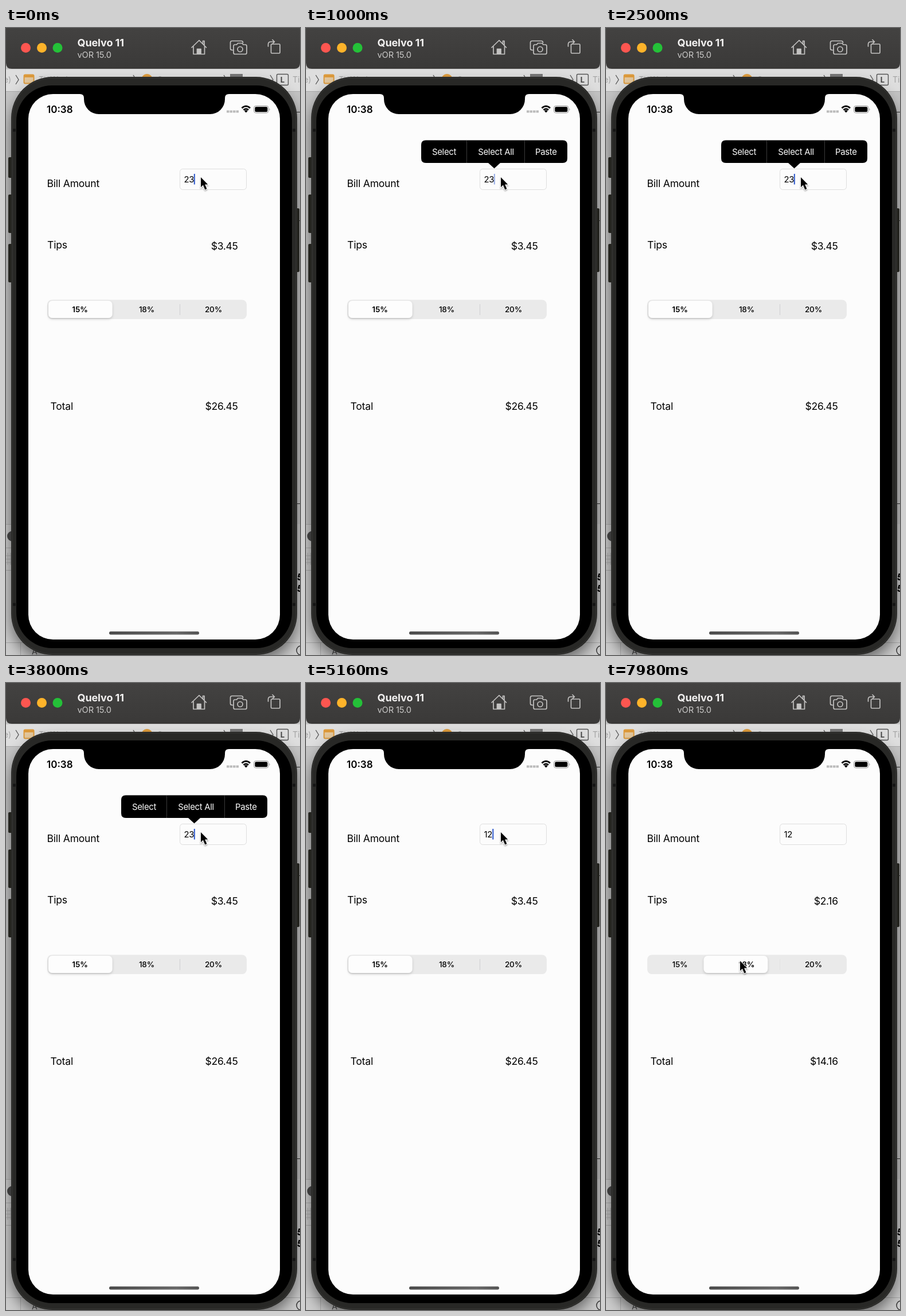
An HTML page for the animation above (8 s loop, 513 by 1092 pixels).

```html
<!DOCTYPE html>
<html lang="en">
<head>
<meta charset="utf-8">
<title>Tip calculator</title>
<style>
html, body { margin: 0; width: 100%; height: 100%; overflow: hidden; background: #b9b9b9; }
svg { display: block; width: 100%; height: 100%; }
text { font-family: Inter, Roboto, sans-serif; }
.label { font-size: 17.5px; letter-spacing: -.17px; }
.field { font-size: 14.9px; letter-spacing: -.3px; }
.seg { font-size: 13.6px; font-weight: 500; text-anchor: middle; letter-spacing: -.15px; }
.menu { font-size: 14.9px; letter-spacing: -.3px; text-anchor: middle; fill: #fff; }
.icon { fill: none; stroke: #c3c2c1; stroke-width: 1.7; stroke-linejoin: round; stroke-linecap: round; }
.end { text-anchor: end; letter-spacing: -.3px; }
</style>
</head>
<body>
<svg viewBox="0 0 513 1092">
  <defs>
    <filter id="blur" x="-20%" y="-20%" width="140%" height="140%"><feGaussianBlur stdDeviation="13"/></filter>
    <filter id="soft" x="-50%" y="-80%" width="200%" height="260%"><feGaussianBlur stdDeviation="9"/></filter>
    <filter id="lift" x="-10%" y="-20%" width="120%" height="150%"><feDropShadow dx="0" dy="2" stdDeviation="2" flood-opacity=".18"/></filter>
    <filter id="drop" x="-40%" y="-20%" width="200%" height="160%"><feDropShadow dx="0" dy="2" stdDeviation="1.4" flood-opacity=".35"/></filter>
    <linearGradient id="bar" x2="0" y2="1"><stop stop-color="#434241"/><stop offset="1" stop-color="#3a3938"/></linearGradient>
    <linearGradient id="home"><stop stop-color="#4c4c4c"/><stop offset=".75" stop-color="#6a6a6a"/><stop offset="1" stop-color="#555"/></linearGradient>
  </defs>

  <!-- window behind the phone -->
  <rect width="513" height="1092" fill="#c4c4c4"/>
  <rect y="72" width="513" height="38" fill="#dedede"/>
  <rect y="864" width="513" height="228" fill="#cdcdcd"/>
  <path d="M0 110.5H513M0 864.5H30M0 905.5H30M0 944.5H30M0 1070.5H513M25.5 1071V1092" stroke="#aaa" fill="none"/>
  <g font-size="14" fill="#a4a4a4">
    <text x="-4" y="95">e)</text>
    <text x="57" y="95">TipWork</text><text x="264" y="95">Screens</text>
    <text x="500" y="95">Ti</text>
  </g>
  <path d="M17 82l5 8-5 8M222 82l5 8-5 8M380 82l5 8-5 8M461 82l5 8-5 8" fill="none" stroke="#555" stroke-width="1.3"/>
  <rect x="31.5" y="81.5" width="17" height="15" rx="2" fill="#e4c89e" stroke="#dc9a3c" stroke-width="2"/>
  <path d="M32 84h16" stroke="#dc9a3c" stroke-width="4"/>
  <circle cx="246" cy="90" r="10" fill="#dc9a3c"/>
  <rect x="391" y="80" width="22" height="16" fill="#777"/>
  <path d="M0 925h9M0 919h9M0 931h9M3 914v21M8 914v21" stroke="#aaa"/>
  <rect x="472.5" y="80.5" width="20" height="19" rx="2" fill="#ddd" stroke="#555" stroke-width="1.4"/>
  <text x="482.5" y="95" font-size="13" font-weight="700" text-anchor="middle" fill="#444">L</text>
  <rect x="9" y="101" width="499" height="1002" rx="72" filter="url(#blur)" opacity=".5"/>
  <circle cx="11" cy="885" r="9" fill="#3c3c3c"/>
  <path d="M500 146.5H513M500 335.5H513M500 828.5H513" stroke="#222"/>
  <text x="45" y="1091" font-size="14" fill="#333">A</text>
  <circle cx="515" cy="1084" r="8" fill="none" stroke="#333" stroke-width="1.5"/>
  <g font-size="16" font-weight="800" font-style="italic"><text x="508" y="962">5</text><text x="508" y="982">5</text></g>

  <!-- simulator title bar -->
  <path d="M0 0H513V61Q513 71 503 71H10Q0 71 0 61Z" fill="url(#bar)"/>
  <circle cx="34.5" cy="34.5" r="8.5" fill="#fd5650"/>
  <circle cx="62.5" cy="34.5" r="8.5" fill="#fdb32a"/>
  <circle cx="90" cy="34.5" r="8.5" fill="#24c138"/>
  <text x="124.5" y="32" font-size="18" font-weight="700" letter-spacing="-.1" fill="#f3f2f1">Quelvo 11</text>
  <text x="124.5" y="51.5" font-size="14.6" letter-spacing="-.1" fill="#cbcac9">vOR 15.0</text>
  <g class="icon">
    <path d="M324 34L337 21.5L349.5 34M327 32V45.5H346.5V32M343.5 27V22.5H346V30"/>
    <path d="M333.5 45V36.5H340V45Z" fill="#c3c2c1"/>
    <path d="M396 38.5H394.5Q391.5 38.5 391.5 35.5V25.5Q391.5 22.5 394.5 22.5H410.5Q413.5 22.5 413.5 25.5"/>
    <path d="M399.5 29H402.5L404.5 26.5H412L414 29H417.5Q420 29 420 31.5V43Q420 45.5 417.5 45.5H399.5Q397 45.5 397 43V31.5Q397 29 399.5 29Z"/>
    <circle cx="408.5" cy="37" r="4.5"/>
    <rect x="462.5" y="28" width="15.5" height="16" rx="1.5"/>
    <path d="M457.5 32V28.5Q457.5 24 462 24H468M465 20.5L468.5 24L465 27.5"/>
  </g>

  <!-- phone body -->
  <g fill="#24241f">
    <rect x="4" y="225" width="9" height="36" rx="2"/><rect x="4" y="290" width="9" height="67" rx="2"/>
    <rect x="4" y="376" width="9" height="67" rx="2"/><rect x="503" y="314" width="9" height="111" rx="2"/>
  </g>
  <rect x="9" y="85" width="499" height="1007" rx="72" fill="#282826"/>
  <rect x="11" y="87" width="495" height="1003" rx="70" fill="none" stroke="#383836"/>
  <path d="M12 178h5M500 178h5M12 1004h5M500 1004h5" stroke="#151515" stroke-width="5"/>
  <rect x="18" y="100" width="481" height="980" rx="62"/>
  <rect x="39" y="115" width="439" height="950" rx="43" fill="#fcfcfc"/>
  <path d="M129 114H389V115Q382 115 382 122V124A26 26 0 0 1 356 150H162A26 26 0 0 1 136 124V122Q136 115 129 115Z"/>

  <!-- status bar -->
  <text x="71" y="147.5" font-size="17" font-weight="600">10:38</text>
  <path d="M385 145.5h4.5M390.5 145.5h4.5M396 145.5h4.5M401.5 145.5h4.5" stroke="#bbb" stroke-width="4"/>
  <path d="M411.5 139.5Q418.8 132.8 426 139.5M414.5 142.8Q418.8 138.8 423 142.8" fill="none" stroke="#000" stroke-width="2.7"/>
  <path d="M415.8 144.3Q418.8 141.8 421.8 144.3L418.8 147.5Z"/>
  <rect x="432.5" y="135.5" width="25.5" height="12.5" rx="3.8" fill="none" stroke="#999"/>
  <rect x="434.3" y="137.3" width="22" height="9" rx="2.2"/>
  <path d="M459.5 139.5Q461.5 141.8 459.5 144Z" fill="#999"/>

  <!-- app -->
  <g class="label">
    <text x="71.5" y="276.5">Bill Amount</text>
    <text x="72" y="384">Tips</text>
    <text x="77.5" y="665">Total</text>
    <text x="404.7" y="385.5" class="end" id="tip"></text>
    <text x="404.7" y="665" class="end" id="total"></text>
  </g>
  <g id="loupe">
    <ellipse cx="328" cy="263" rx="52" ry="36" fill="#eee" filter="url(#soft)"/>
    <rect x="288.5" y="241" width="80" height="44" rx="22" fill="#fff"/>
    <text x="310.5" y="269" class="field">23</text>
    <rect x="327.8" y="254" width="2" height="18.5" fill="#2c58cc"/>
  </g>
  <rect x="303.5" y="245.5" width="116" height="36" rx="5" fill="none" stroke="#dedede"/>
  <text x="310.5" y="269" class="field" id="bill"></text>
  <rect y="254" width="2" height="18.5" fill="#2c58cc" id="caret"/>

  <rect x="72" y="473.5" width="348" height="33.5" rx="8" fill="#eaeaea"/>
  <path d="M303.5 481V500" stroke="#cfcfd1" id="split"/>
  <rect x="74" y="475" width="111.5" height="30" rx="7" fill="#fdfdfd" filter="url(#lift)" id="pill"/>
  <text x="129" y="495" class="seg" id="low">15%</text>
  <text x="245.5" y="495" class="seg" id="mid">18%</text>
  <text x="362" y="495" class="seg">20%</text>

  <g id="popup">
    <path d="M209 195.5H448Q456 195.5 456 203.5V227Q456 235 448 235H339L328.5 244.5L318 235H209Q201 235 201 227V203.5Q201 195.5 209 195.5Z"/>
    <path d="M280.5 196V235M381.5 196V235" stroke="#3a3a3a"/>
    <text x="241" y="220.5" class="menu">Select</text>
    <text x="331.5" y="220.5" class="menu">Select All</text>
    <text x="418.8" y="220.5" class="menu">Paste</text>
  </g>
  <rect x="180" y="1051" width="157" height="5.5" rx="2.7" fill="url(#home)"/>
  <g id="mouse">
    <path d="M0 0V18.5L4.2 14.6L7.8 23L11.2 21.5L7.6 13.4H13.2Z" transform="scale(.93)" stroke="#fff" stroke-width="2" paint-order="stroke" filter="url(#drop)"/>
  </g>
</svg>
<script>
const $ = id => document.getElementById(id);
const ramp = (t, a, b) => Math.min(1, Math.max(0, (t - a) / (b - a)));
const ease = p => p * p * (3 - 2 * p);
const pulse = (t, a, b, c, d) => ramp(t, a, b) - ramp(t, c, d);
// value of the last [time, value] entry already reached
const at = (t, list) => list.filter(e => t >= e[0]).pop()[1];
const set = (id, attrs) => { for (const k in attrs) $(id).setAttribute(k, attrs[k]); };
const write = (id, s) => { if ($(id).textContent !== s) $(id).textContent = s; };

const CLICK = 7755;
const BILL = [[0, "23"], [4000, "2"], [4110, ""], [4700, "1"], [4900, "12"]];
const CARET_X = { "": 310.5, "1": 317, "2": 320, "23": 327.8, "12": 325.3 };
const BLINKS = [0, 400, 1700, 2300, 4000, 4110, 4700, 4900].map(s => [s, s]);
const PATH = [[5850, 340, 260], [6280, 311, 378], [6800, 234, 484]];

function mouseAt(t) {
  const [a, b, c] = PATH;
  const p = ramp(t, a[0], b[0]) ** 1.4, q = 1 - (1 - ramp(t, b[0], c[0])) ** 1.7;
  return [1, 2].map(i => a[i] + (b[i] - a[i]) * p + (c[i] - b[i]) * q);
}

function draw(t) {
  const clicked = t >= CLICK, bill = at(t, BILL);
  write("bill", bill);
  write("tip", clicked ? "$2.16" : "$3.45");
  write("total", clicked ? "$14.16" : "$26.45");

  const phase = (t - at(t, BLINKS)) % 1000;
  set("caret", { x: CARET_X[bill], opacity: clicked ? 0 : 1 - pulse(phase, 500, 700, 850, 1000) });

  set("popup", { opacity: pulse(t, 400, 600, 1750, 1945) + pulse(t, 2250, 2450, 4030, 4230) });
  const k = pulse(t, 1870, 2010, 2150, 2290);
  set("loupe", { opacity: k, transform: `translate(0 ${-44 * k})` });

  const slide = ease(ramp(t, CLICK, CLICK + 300));
  set("pill", { x: 74 + 114 * slide });
  set("split", { opacity: 1 - .85 * slide });
  $("low").style.fontWeight = clicked ? 500 : 600;
  $("mid").style.fontWeight = clicked ? 600 : 500;
  set("mouse", { transform: `translate(${mouseAt(t)})` });
}

const start = performance.now();
function frame(now) {
  draw(Math.max(0, now - start) % 8000);
  requestAnimationFrame(frame);
}
draw(0);
requestAnimationFrame(frame);
</script>
</body>
</html>
```
